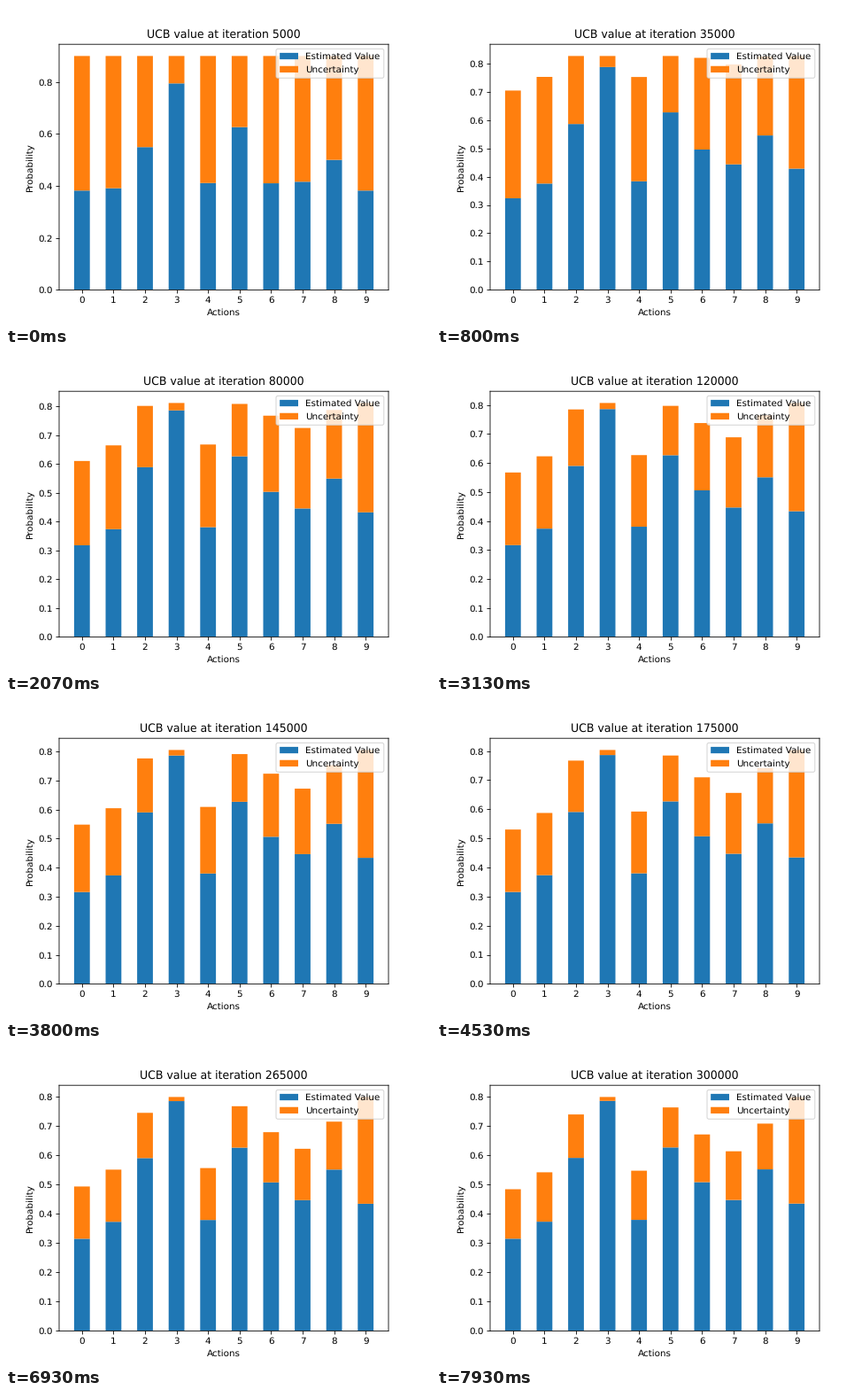
A matplotlib script that plays this animation: 480x360 px, repeating every 8000 ms.

```python
import numpy as np
import matplotlib.pyplot as plt
from matplotlib.animation import FuncAnimation

plt.rcParams.update({"text.hinting": "none", "path.snap": False})

STEP = 5000          # iterations between two charts
CHARTS = 60
FRAMES, INTERVAL = 200, 40
BEST = 3             # the arm that takes nearly all pulls

# Mean reward of each arm: after the first chart, and in the long run.
FIRST = np.array([.382, .391, .549, .794, .411, .626, .410, .416, .500, .382])
FINAL = np.array([.314, .373, .592, .786, .379, .627, .510, .448, .553, .436])

# Evidence (1 / uncertainty squared) gained per chart. Random exploration
# is shared evenly, but never reaches the last arm.
GAIN = np.full(10, .53)
GAIN[BEST], GAIN[-1] = 95, 0


def run():
    """Return (value, uncertainty) of all arms for every chart."""
    evidence = np.zeros(10)
    evidence[BEST] = 90
    charts = []
    for n in range(1, CHARTS + 1):
        value = FINAL + (FIRST - FINAL) / n
        # An arm whose bound would pass the best one is pulled until it is level.
        bound = value[BEST] + evidence[BEST] ** -.5
        others = np.arange(10) != BEST
        needed = (bound - value[others]) ** -2
        evidence[others] = np.maximum(evidence[others], needed)
        charts.append((value, evidence ** -.5))
        evidence = evidence + GAIN
    return charts


charts = run()
fig, ax = plt.subplots(figsize=(6.4, 4.8), dpi=75)
arms = np.arange(10)
value, spread = charts[0]
lower = ax.bar(arms, value, 0.5, color="#1f77b4", label="Estimated Value")
upper = ax.bar(arms, spread, 0.5, bottom=value, color="#ff7f0e",
               label="Uncertainty")
ax.set_xticks(arms)
ax.set_xlabel("Actions")
ax.set_ylabel("Probability")
ax.legend(loc="upper right")
title = ax.set_title("")


def show(frame):
    chart = (2 * frame + 1) * CHARTS // (2 * FRAMES)
    value, spread = charts[chart]
    for low, high, v, s in zip(lower, upper, value, spread):
        low.set_height(v)
        high.set_y(v)
        high.set_height(s)
    ax.set_ylim(0, 1.05 * (value + spread).max())
    title.set_text(f"UCB value at iteration {(chart + 1) * STEP}")
    return [title, *lower, *upper]


anim = FuncAnimation(fig, show, frames=FRAMES, interval=INTERVAL,
                     init_func=lambda: show(0), repeat=True, repeat_delay=0)
plt.show()
```
